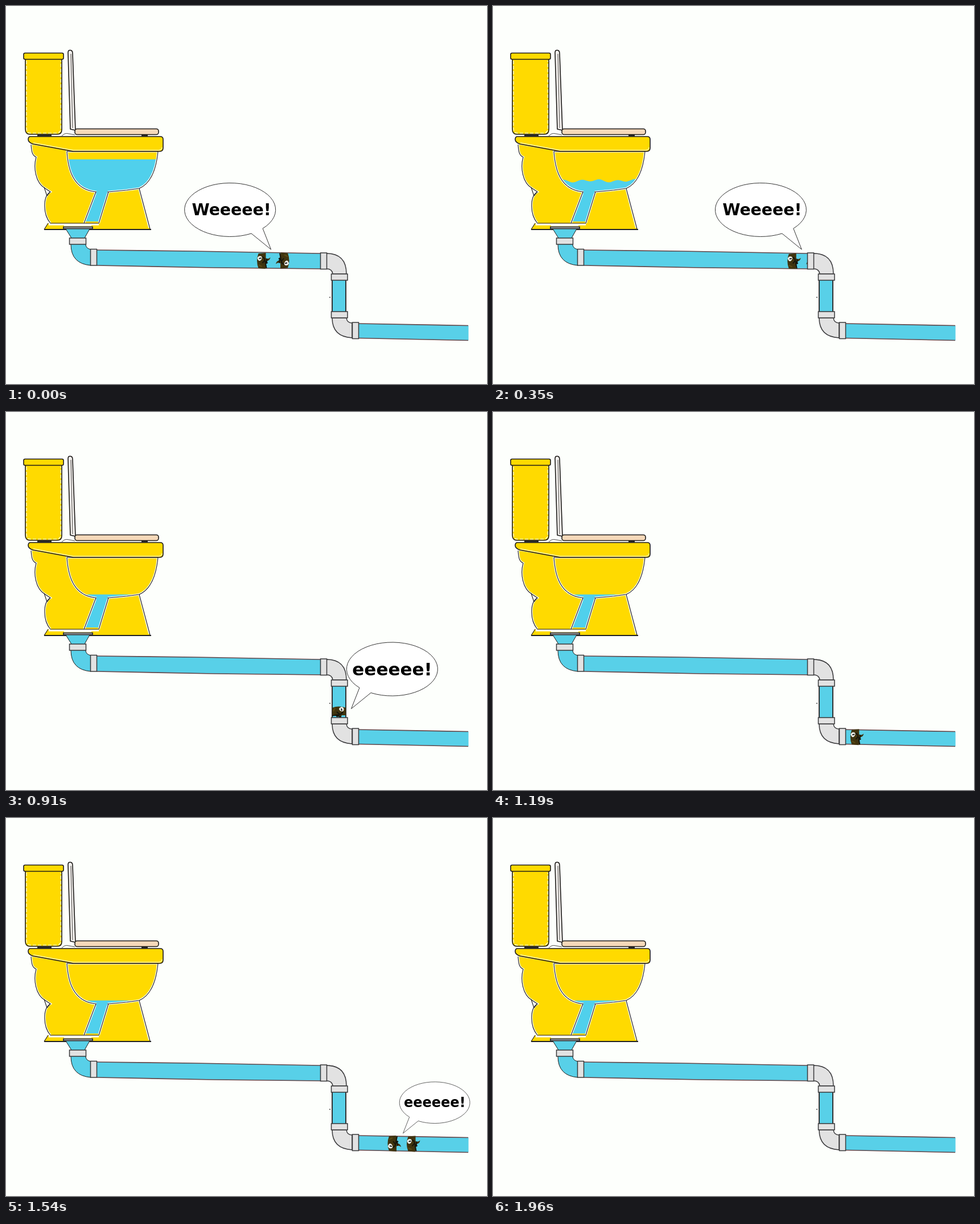
Recreate the animation shown at these times as an HTML page. Size 845 by 663 pixels, loop 2030 ms.

```html
<!DOCTYPE html>
<html lang="en">
<head>
<meta charset="utf-8">
<title>Down the pipe</title>
<style>
html, body { margin: 0; width: 100%; height: 100%; overflow: hidden; background: #fdfffc; }
svg { display: block; width: 845px; height: 663px; }
.line { fill: none; stroke: #1c1a18; stroke-width: 1.6; stroke-linejoin: round; }
.halo { fill: none; stroke: #fff; stroke-width: 3.6; }
.yellow { fill: #ffda00; }
.water { fill: #58d0e8; }
.basin { fill: #50d0ec; }
.wall { fill: none; stroke: #64474a; stroke-width: 1.6; }
.fitting { fill: #e2e2e2; stroke: #38383a; stroke-width: 1.5; }
.bubble path { fill: #fff; stroke: #333; stroke-width: 1; }
.bubble text { font: bold 28.3px "DejaVu Sans", Verdana, sans-serif; text-anchor: middle; }
</style>
</head>
<body>
<svg viewBox="0 0 845 663">
  <defs>
    <path id="bowl" d="M107 255C109 287 118 322 158 326L180 326L212 323L234 320C255 311 264 286 267 255Z"/>
    <path id="body" d="M44 243C45 256 46 262 53 265C48 282 51 310 69 320L78 326C64 334 65 366 78 381L163 381L180 326L234 320L267 255L118 255Z"/>
    <path id="side" d="M44 243C45 256 46 262 53 265C48 282 51 310 69 320L78 326C64 334 65 366 78 381"/>
    <path id="trap" d="M158 326L137 381M180 326L163 381"/>
    <path id="rim" d="M42 229H271Q276 229 276 234V249Q276 255 270 255H118L47 242Q39 239 39 234Q39 230 42 229Z"/>
    <path id="tank" d="M34 93V216Q34 225 42 225H90Q98 225 98 217V93"/>
    <clipPath id="inBowl"><use href="#bowl"/></clipPath>
    <clipPath id="inPipe">
      <path d="M160 428H557V461H160ZM573 478H597V541H573ZM614 555H812V587H614Z"/>
    </clipPath>
    <g id="critter">
      <path d="M5-14L-8-13Q-13 0-8 13L4 14Q7 7 4 2L8 0Q12-1 13-6Q8-2 5-5Z" fill="#40340f"/>
      <path d="M-1-7Q4-4 3 0L8 4M3-1L-1 4M4 2L6 13M7-4L6 5" fill="none" stroke="#15150c" stroke-width="2"/>
      <path d="M-10-5Q-8-10-3-8Q0-5-4-1Q-8 2-10-5Z" fill="#f2f4ed"/>
      <path d="M-7-4L-3-5" stroke="#222" stroke-width="2"/>
      <path d="M-8 7L-2 10" stroke="#5a4913" stroke-width="2"/>
    </g>
  </defs>

  <!-- cistern -->
  <use href="#tank" class="yellow"/>
  <path d="M36 96V214Q36 223 43 223H89Q96.500 223 96.500 214V96" fill="none" stroke="#fff" stroke-width="1.200" stroke-dasharray="6 3"/>
  <use href="#tank" class="line"/>
  <rect class="line" style="fill:#ffda00" x="31" y="82.500" width="70" height="11" rx="2.500"/>
  <path d="M55 227H80M238 227H249" stroke="#222" stroke-width="3"/>

  <!-- lid and seat -->
  <path class="line" style="fill:#f4f1ee" d="M109 82Q109 77 113 77.500Q117 78 117 83L122 218L113 216Z"/>
  <path class="line" d="M114 84L117 214M98 228Q103 222 110 224L121 226" style="stroke-width:.8"/>
  <rect class="line" style="fill:#f6d9b9" x="121" y="215.500" width="147" height="10" rx="4"/>

  <!-- body -->
  <use href="#body" class="yellow"/>
  <path class="yellow" d="M180 326L234 320L253 391H67L74 381H163Z"/>
  <use href="#bowl" class="yellow"/>
  <path class="basin" d="M158 325H180L163 378H139Z"/>
  <path id="level" class="basin" clip-path="url(#inBowl)"/>
  <g class="halo"><use href="#bowl"/><use href="#trap"/><use href="#side"/><path d="M75 383H163M234 320L252 389"/></g>
  <g class="line" style="stroke-width:1.1">
    <use href="#bowl"/><use href="#trap"/><use href="#side"/>
    <path d="M67 318L72 333L78 326M78 381H163M67 392L74 381M234 320L253 391"/>
  </g>
  <path class="basin" d="M159.500 323.500H179L177 330H158Z"/>
  <path d="M67 392H255" stroke="#222" stroke-width="1.800"/>
  <use href="#rim" class="yellow"/>
  <path class="halo" style="stroke-width:1" d="M48 240L118 253H269Q274 252 274 248"/>
  <use href="#rim" class="line"/>

  <!-- water-filled pipes -->
  <path class="water" d="M105 391H147L138 407H115ZM114 418H140Q140 425 149 427V455Q114 452 114 418Z"/>
  <path class="line" style="stroke-width:1" d="M105 391L115 407M147 391L138 407M114 418Q114 452 149 455M140 418Q140 425 149 427"/>
  <path d="M102 385.500H150" stroke="#fff" stroke-width="2"/>
  <path d="M100 389H153" stroke="#38383a" stroke-width="5"/>
  <path d="M102 389H151" stroke="#8d8d90" stroke-width="2"/>
  <path class="water" d="M160 428L330 430L553 434V461L365 459L160 455Z"/>
  <path class="water" d="M573 481H597V537H573Z"/>
  <path class="water" d="M619 557L812.500 560.500V586.500L619 582.500Z"/>
  <path class="wall" d="M160 428L330 430L553 434M160 455L365 459L553 461M619 557L812 560.500M619 582.500L812 586.500"/>
  <path class="wall" style="stroke:#333;stroke-width:2" d="M573 481V537M597 481V537"/>
  <path d="M568 511H570" stroke="#444" stroke-width="1.500"/>

  <g id="critters" clip-path="url(#inPipe)">
    <use href="#critter"/><use href="#critter"/><use href="#critter"/><use href="#critter"/><use href="#critter"/>
  </g>

  <!-- fittings -->
  <g class="fitting">
    <path d="M563 434Q598 434 598 470H574Q573 461 563 461Z"/>
    <path d="M573 547H598Q599 556 608 556V582Q573 580 573 547Z"/>
    <rect x="111.500" y="407" width="29" height="11"/>
    <rect x="148.500" y="426.500" width="11" height="28.500"/>
    <rect x="552.500" y="433" width="11" height="28.500"/>
    <rect x="571.500" y="470" width="28.500" height="11"/>
    <rect x="571.500" y="536" width="28.500" height="11"/>
    <rect x="608.500" y="555" width="11" height="28.500"/>
  </g>

  <!-- bubbles, each with its origin at the tip of the tail -->
  <g id="first" class="bubble">
    <path d="M-34.500-28A80 47 0 1 1-14.500-36.800L0 0Z"/>
    <text x="-69.500" y="-60">Weeeee!</text>
  </g>
  <g id="second" class="bubble">
    <path d="M34.500-28A80 47 0 1 0 14.500-36.800L0 0Z"/>
    <text x="72" y="-59" style="font-size:31px">eeeeee!</text>
  </g>
</svg>
<script>
const STEP = 70, STEPS = 29, SPEED = 15.25, DROP = 8.25;
const byId = id => document.getElementById(id);
const [upperBack, upperFront, falling, lowerBack, lowerFront] = byId('critters').children;

function place(node, visible, x, y, extra = '') {
  node.setAttribute('visibility', visible ? 'visible' : 'hidden');
  node.setAttribute('transform', `translate(${x} ${y}) ${extra}`);
}

function drawLevel(n) {
  const base = Math.min(269 + 7.5 * n, 320);
  const height = n > 0 && n < 7 ? 14 / n : 0;
  let d = 'M100 335';
  for (let x = 100; x <= 275; x += 3) {
    const ripple = Math.sin(x / 5 + n) + 0.5 * Math.sin(x / 11 - n);
    d += `L${x} ${(base + height * ripple / 1.4).toFixed(1)}`;
  }
  byId('level').setAttribute('d', d + 'V335Z');
}

function draw(n) {
  drawLevel(n);

  const along = SPEED * n;
  place(upperBack, n < 8, 451.5 + along, 447 + n * 0.15);
  place(upperFront, n < 8, 487 + along, 446.5 + n * 0.15, 'rotate(180)');
  place(byId('first'), n < 8, 465.5 + 15.35 * n, 427);

  const fall = DROP * (n - 9);
  place(falling, n > 6 && n < 16, 585, 494 + fall, 'rotate(90)');

  const late = n - 20;
  const inLower = n > 14 && n < 28;
  place(lowerBack, inLower, 650.5 + SPEED * late, 570.5 + late * 0.25, 'scale(1 -1)');
  place(lowerFront, inLower, 684 + SPEED * late, 571 + late * 0.25);

  if (n < 17) {
    place(byId('second'), n > 8 && n < 16, 606.5, 487.5 + fall);
  } else {
    const shrink = Math.max(0, 1 - (Math.max(0, late) / 4.79) ** 1.7);
    place(byId('second'), n > 17 && shrink > 0, 667 + SPEED * late, 551 + late, `scale(${shrink})`);
  }
}

function tick(now) {
  draw(Math.floor(now / STEP) % STEPS);
  requestAnimationFrame(tick);
}
draw(0);
requestAnimationFrame(tick);
</script>
</body>
</html>
```
